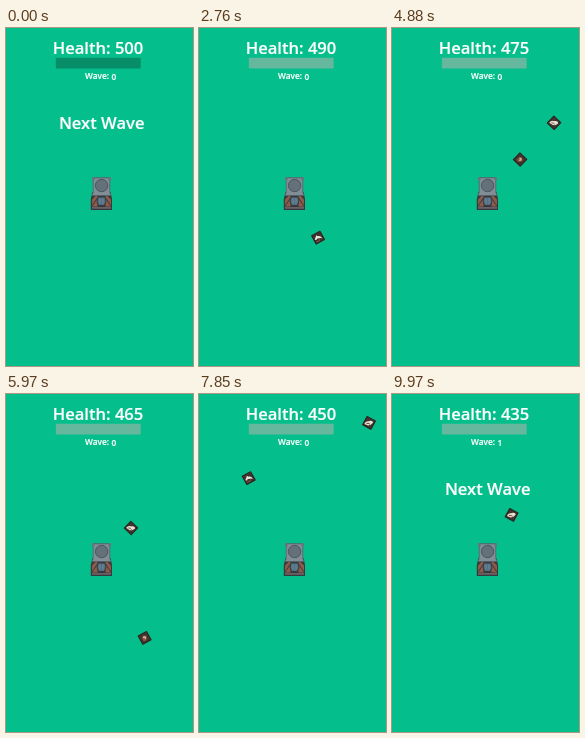
An HTML page that plays this animation: 187x338 px, repeating every 10 s.

```html
<!DOCTYPE html>
<html lang="en">
<head>
<meta charset="utf-8">
<title>Tower defence</title>
<style>
  html, body { margin: 0; width: 100%; height: 100%; overflow: hidden; background: #04be8b; }
  svg { display: block; width: 187px; height: 338px; }
  text { font: 600 16.6px "Open Sans", sans-serif; fill: #fff; stroke: #fff; stroke-width: .2px; }
  .small { font-size: 8.3px; }
  .mid { text-anchor: middle; }
</style>
</head>
<body>
<svg viewBox="0 0 187 338">
  <defs>
    <g id="tile">
      <rect x="-5.3" y="-5.3" width="10.6" height="10.6" rx=".6" fill="#2a211e"/>
      <rect x="-4.4" y="-4.4" width="8.8" height="8.8" fill="#40322d"/>
    </g>
    <g id="claw">
      <use href="#tile"/>
      <path d="M-2.6 2.6 Q-3 -.6 -.4 -3.2 L.6 -1.2 L2.6 -1.8 Q2.8 1.8 -.2 3.2Z" fill="#84503f"/>
      <path d="M-2 -1 L.4 -2.2 L1.8 -.4 L.4 2 L-.4 .2Z" fill="#d3ab94"/>
    </g>
    <g id="fang">
      <use href="#tile"/>
      <path d="M-4 .2 L-.4 -2.8 L.4 -1.4 Q3 -.8 3.4 2.6 Q1.6 .8 -.2 .8 L-1.2 .2 L-2.6 1.4Z" fill="#eee8e1"/>
      <path d="M-3.4 2.8 L-.8 3.4 L1 2.2" fill="none" stroke="#8b5a48" stroke-width=".9"/>
    </g>
    <g id="skull">
      <use href="#tile"/>
      <path d="M-3.6 3.2 Q-4 0 -1.6 -1 L.2 -2.6 Q2.2 -4 3.4 -2.4 L2.6 .8 L.6 2.6Z" fill="#e9e1d6"/>
      <path d="M-2 1.8 L-.2 .6 L1.6 .8" fill="none" stroke="#7a5a4a" stroke-width=".9"/>
    </g>
  </defs>

  <rect width="187" height="338" fill="#04be8b"/>
  <text id="health" class="mid" x="92" y="26"></text>
  <rect id="bar" x="49.8" y="29.8" width="84.9" height="10.6" rx=".6"/>
  <text class="small" x="79" y="51.4">Wave:</text>
  <text id="wave" class="small" x="105.6" y="52"></text>
  <text id="next" class="mid" x="95.7" y="101.4">Next Wave</text>

  <g id="enemies"></g>

  <g id="tower">
    <path d="M86.5 164 H104.5 L106 171 V182 H84.8 V171Z" fill="#3b383d"/>
    <path d="M86 171.5 L89.5 168 H91.5 V178.5 H86Z M105 171.5 L101.5 168 H99.5 V178.5 H105Z" fill="#8f5b49"/>
    <path d="M86 178 L91.5 170 M105 178 L99.5 170" stroke="#4a3e41" stroke-width="1.1"/>
    <path d="M86 179.9 H105" stroke="#716d73" stroke-width="1.4"/>
    <path d="M86.8 149.3 H104.2 V164 L105.6 168 H85.4 L86.8 164Z" fill="#56616a"/>
    <path d="M87.6 150.3 H103.4 V164.5 L104.4 167 H86.6 L87.6 164.5Z" fill="#828e96"/>
    <path d="M86 149.2 h2.6 v3 h-2.6z M102.4 149.2 h2.6 v3 h-2.6z" fill="#68747d"/>
    <circle cx="95.6" cy="157.5" r="6.2" fill="#64707a" stroke="#4b5660"/>
    <path d="M92 169 H99 L100 173 L98.4 177.5 H92.6 L91 173Z" fill="#557083" stroke="#2e3841" stroke-width=".9"/>
    <path d="M94 170.5 V175.5 M97 170.5 V175.5" stroke="#7590a0" stroke-width=".8"/>
  </g>
</svg>
<script>
const LOOP = 10000, SPEED = 0.0495, HIT_RADIUS = 24;
const CENTER = { x: 95.2, y: 165.5 };
const $ = id => document.getElementById(id);

// spawn ms, hit ms, bearing from the tower, damage, sprite, tilt
const enemies = [
  [210, 1829, -158.9, 10, "claw", 21],
  [1235, 3290, 61.6, 15, "fang", -28.4],
  [2250, 5352, -46, 10, "claw", 44],
  [3260, 6362, -46.6, 5, "skull", 43.4],
  [5280, 7296, 61, 10, "claw", -29],
  [6300, 9250, -119.2, 15, "fang", -29.2],
  [7310, 10513, -61.3, 5, "skull", 28.7]
].map(([spawn, hit, bearing, damage, sprite, tilt]) => {
  const node = document.createElementNS("http://www.w3.org/2000/svg", "use");
  node.setAttribute("href", "#" + sprite);
  $("enemies").append(node);
  const a = bearing * Math.PI / 180;
  return { spawn, hit, damage, tilt, node, dx: Math.cos(a), dy: Math.sin(a) };
});

function draw(t) {
  let health = 500;
  for (const e of enemies) {
    if (t >= e.hit) health -= e.damage;
    const alive = t >= e.spawn && t < e.hit;
    e.node.setAttribute("visibility", alive ? "visible" : "hidden");
    const r = HIT_RADIUS + (e.hit - t) * SPEED;
    const x = CENTER.x + e.dx * r, y = CENTER.y + e.dy * r;
    e.node.setAttribute("transform", `translate(${x} ${y}) rotate(${e.tilt})`);
  }
  const cleared = t >= 8330;
  $("health").textContent = "Health: " + health;
  $("bar").setAttribute("fill", health < 500 ? "#65b79d" : "#078d68");
  $("wave").textContent = cleared ? 1 : 0;
  $("next").setAttribute("visibility", t < 210 || cleared ? "visible" : "hidden");
}

const start = performance.now();
function tick() {
  draw((performance.now() - start) % LOOP);
  requestAnimationFrame(tick);
}
draw(0);
requestAnimationFrame(tick);
</script>
</body>
</html>
```
